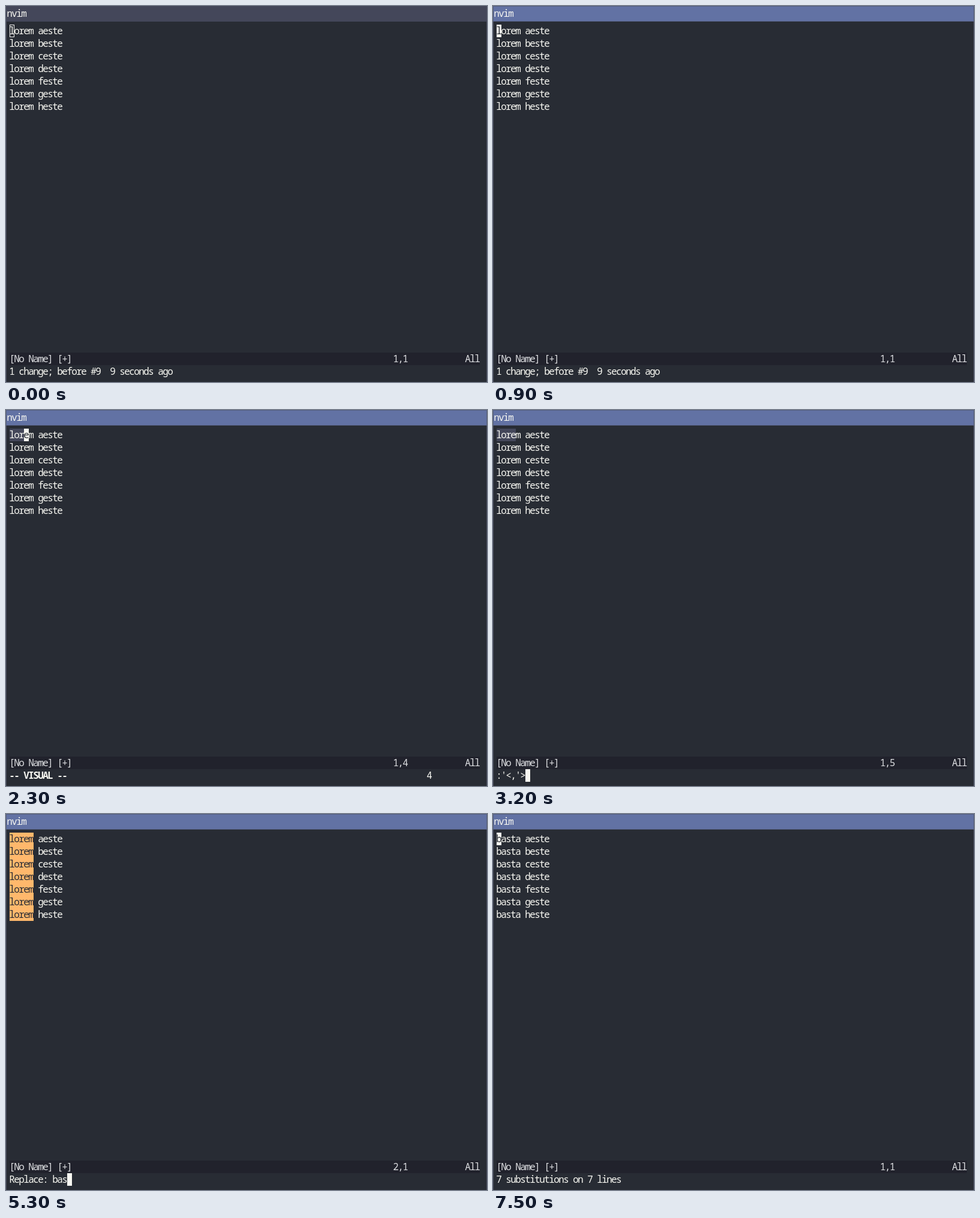
Recreate the animation shown at these times as an HTML page with a canvas. Size 802 px wide and 626 px high, loop 8000 ms.

```html
<!DOCTYPE html>
<html lang="en">
<head>
<meta charset="utf-8">
<title>nvim replace</title>
<style>
html, body { margin: 0; width: 100%; height: 100%; overflow: hidden; background: #282c34; }
canvas { display: block; }
</style>
</head>
<body>
<canvas id="screen" width="802" height="626"></canvas>
<script>
const ctx = document.getElementById('screen').getContext('2d');
const LOOP = 8000, CELL = 8, LINE = 21, LEFT = 6, TOP = 31;
const STATUS = 26, MESSAGE = 27;
const BG = '#282c34', FG = '#f8f8f2', GRAY = '#44475a', BLUE = '#6272a4', EDGE = '#535d7f';
const ORANGE = '#ffb86c', PURPLE = '#b072d0', DARK = '#21222c', DIM = '#dcdde0';
const FONT = 'condensed 16px "Noto Sans Mono", "DejaVu Sans Mono", monospace';
const words = ['aeste', 'beste', 'ceste', 'deste', 'feste', 'geste', 'heste'];

// Event times in ms
const FOCUS = 100, VISUAL = 1100, COLON = 3000, PROMPT = 4400, CONFIRM = 6000, DONE = 6900;
const moves = [1900, 2100, 2300, 2500];

function rect(x, y, w, h, color) {
  ctx.fillStyle = color;
  ctx.fillRect(x, y, w, h);
}

function print(text, x, baseline, color) {
  ctx.fillStyle = color;
  [...text].forEach((c, i) => ctx.fillText(c, x + (i + 0.5) * CELL, baseline));
}

function put(text, col, row, color = FG, bg) {
  const x = LEFT + col * CELL, y = TOP + row * LINE;
  if (bg) rect(x, y, text.length * CELL, LINE, bg);
  print(text, x, y + 16, color);
}

const typed = (text, t, start, step) =>
  text.slice(0, Math.max(0, Math.floor((t - start) / step + 1.001)));

function message(text, color) {
  put(text, 0, MESSAGE, color);
  put(' ', text.length, MESSAGE, FG, FG);
}

function drawWindow(focused) {
  rect(0, 0, 802, 626, BG);
  rect(0, 0, 802, 26, focused ? EDGE : GRAY);
  if (focused) rect(1, 1, 800, 24, BLUE);
  rect(0, 26, 1, 600, GRAY);
  rect(801, 26, 1, 600, GRAY);
  print('nvim', 2, 18, FG);
}

function draw(t) {
  ctx.font = FONT;
  ctx.textAlign = 'center';
  drawWindow(t >= FOCUS);

  const matching = t >= PROMPT && t < DONE;
  const first = t < DONE ? 'lorem' : 'basta';
  words.forEach((word, row) => {
    const current = row === 0 && t >= CONFIRM;
    if (matching) put(first, 0, row, current ? ORANGE : BG, current ? BLUE : ORANGE);
    else put(first, 0, row);
    put(word, 6, row);
  });

  const col = t < PROMPT ? moves.filter(m => t >= m).length : 0;
  if (t >= VISUAL && t < PROMPT) put(first.slice(0, col), 0, 0, FG, GRAY);
  if (t < FOCUS) {
    ctx.strokeStyle = FG;
    ctx.lineWidth = 1;
    ctx.strokeRect(LEFT + 0.5, TOP + 0.5, CELL - 1, LINE - 1);
  } else if (t < COLON || t >= DONE) {
    put(first[col], col, 0, BG, FG);
  }

  rect(LEFT, TOP + STATUS * LINE, 98 * CELL, LINE, DARK);
  put('[No Name] [+]', 0, STATUS, DIM);
  put(matching && t < CONFIRM ? '2,1' : '1,' + (col + 1), 80, STATUS, DIM);
  put('All', 95, STATUS, DIM);

  if (t < VISUAL) {
    put('1 change; before #9  9 seconds ago', 0, MESSAGE);
  } else if (t < COLON) {
    ctx.font = 'bold ' + FONT;
    put('-- VISUAL --', 0, MESSAGE);
    ctx.font = FONT;
    put(String(col + 1), 87, MESSAGE);
  } else if (t < PROMPT) {
    message(":'<,'>" + typed('Replace', t, 3600, 400 / 6));
  } else if (t < CONFIRM) {
    message('Replace: ' + typed('basta', t, 4900, 200));
  } else if (t < DONE) {
    message('replace with basta (y/n/a/q/l/^E/^Y)?', PURPLE);
  } else {
    put('7 substitutions on 7 lines', 0, MESSAGE);
  }
}

const start = performance.now();
function tick() {
  draw((performance.now() - start) % LOOP);
  requestAnimationFrame(tick);
}
tick();
</script>
</body>
</html>
```
